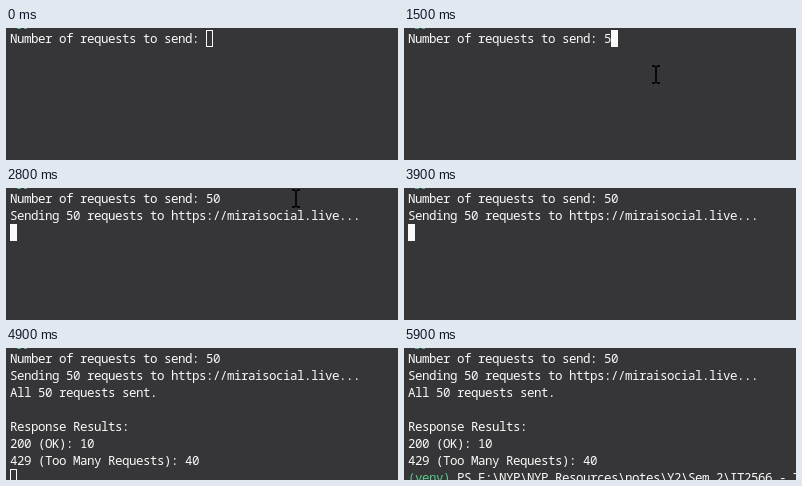
An HTML page with a canvas for the animation above (6 s loop, 392x132 px).

```html
<!DOCTYPE html>
<html lang="en">
<head>
<meta charset="utf-8">
<title>Terminal session</title>
<style>
  html, body { margin: 0; width: 100%; height: 100%; overflow: hidden; background: #363638; }
  canvas { display: block; }
</style>
</head>
<body>
<canvas width="392" height="132"></canvas>
<script>
const ctx = document.querySelector('canvas').getContext('2d');
const LOOP = 6000, TICK = 100;
const LEFT = 4, CHAR = 7, ROW = 17, BASELINE = 15;
const BG = '#363638', FG = '#fafafa', GREEN = '#58c98a';
const PROMPT = 'Number of requests to send: ';

// [start time, row, text]
const output = [
  [2000, 1, 'Sending 50 requests to https://miraisocial.live...'],
  [4800, 2, 'All 50 requests sent.'],
  [4800, 4, 'Response Results:'],
  [4800, 5, '200 (OK): 10'],
  [4800, 6, '429 (Too Many Requests): 40'],
  [5000, 7, '       PS E:\\NYP\\NYP Resources\\notes\\Y2\\Sem 2\\IT2566 - T']
];

// [start time, column, row, solid]
const caretSteps = [
  [0, 28, 0, false], [1100, 28, 0, true], [1500, 29, 0, true], [1700, 30, 0, true],
  [1900, 0, 1, true], [2000, 0, 2, true], [4400, 0, 2, false], [4800, 0, 7, false]
];

function write(text, row, color = FG) {
  ctx.fillStyle = color;
  ctx.fillText(text, LEFT, BASELINE + row * ROW);
}

function drawCaret(t) {
  const [, col, row, solid] = caretSteps.findLast(step => step[0] <= t);
  const x = LEFT + col * CHAR, y = 2 + row * ROW;
  ctx.fillStyle = ctx.strokeStyle = FG;
  if (solid) ctx.fillRect(x, y, CHAR, ROW);
  else ctx.strokeRect(x + .5, y + .5, CHAR - 1, ROW - 1);
}

function pointerAt(t) {
  if (t < 800 || t >= 2900) return null;
  if (t >= 2800) return [290, 10];
  const rest = Math.max(0, (900 - t) / 200);
  return [252 + 120 * rest, 46 + 58 * rest];
}

function drawPointer([x, y]) {
  ctx.fillStyle = '#080808';
  ctx.fillRect(x - 1, y - 8, 2, 17);
  for (const end of [y - 9, y + 8]) {
    ctx.fillRect(x - 4, end, 3, 2);
    ctx.fillRect(x + 1, end, 3, 2);
  }
}

function draw(t) {
  ctx.fillStyle = BG;
  ctx.fillRect(0, 0, 392, 132);
  ctx.font = '500 12.5px "Noto Sans Mono", monospace';
  ctx.letterSpacing = '-0.5px';

  // lower edge of the line scrolled off above
  ctx.fillStyle = '#5fa898';
  ctx.fillRect(11, 0, 4, 1);
  ctx.fillRect(18, 0, 3, 1);

  write(PROMPT + '50'.slice(0, (t >= 1500) + (t >= 1700)), 0);
  for (const [start, row, text] of output) if (t >= start) write(text, row);
  if (t >= 5000) write('(venv)', 7, GREEN);
  else drawCaret(t);

  const pointer = pointerAt(t);
  if (pointer) drawPointer(pointer);
}

function frame() {
  const t = performance.now() % LOOP;
  draw(Math.floor(t / TICK) * TICK);
  requestAnimationFrame(frame);
}
frame();
</script>
</body>
</html>
```
